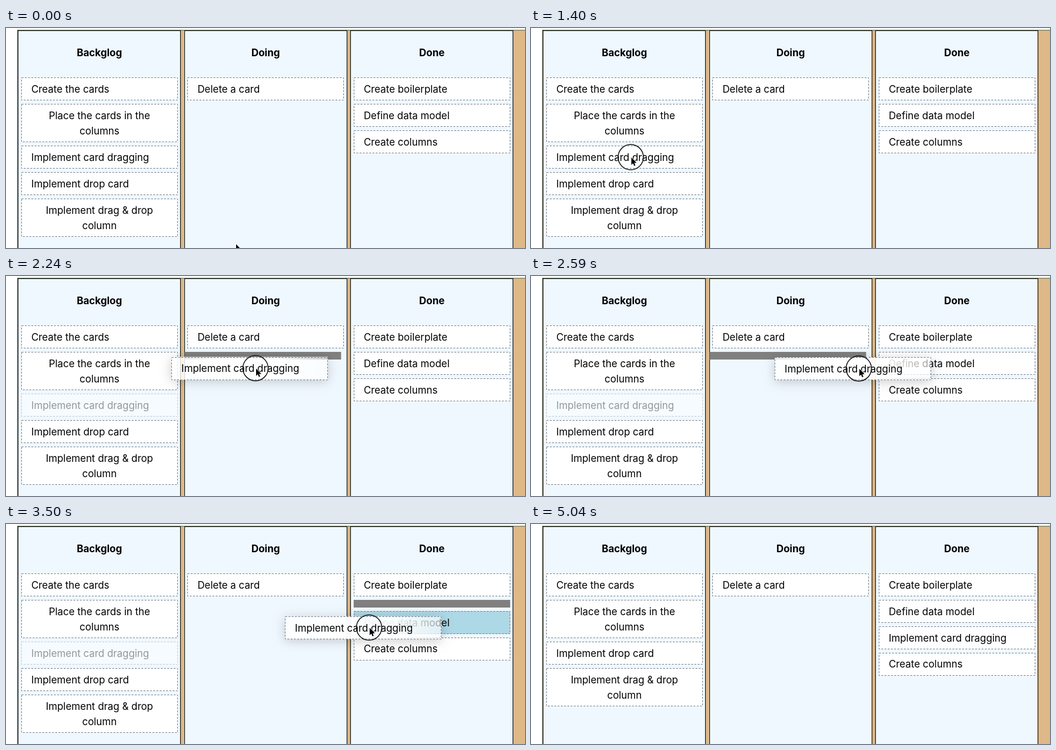
These frames come from a looping animation (882 by 374 pixels, 5740 ms). An HTML page with a canvas:

```html
<!DOCTYPE html>
<html lang="en">
<head>
<meta charset="utf-8">
<title>Kanban board</title>
<style>
  html, body { margin: 0; width: 882px; height: 374px; overflow: hidden; background: #fff; }
  canvas { display: block; }
</style>
</head>
<body>
<canvas id="board" width="882" height="374"></canvas>
<script>
const ctx = document.getElementById('board').getContext('2d');
const LOOP = 5740, STEP = 70;
const FONT = 'Inter, "Open Sans", sans-serif';
const CARD_W = 266, CARD_H = 39, LINE = 26.4, GAP = 5.8, BAR_H = 13;
const MOVED = 'Implement card dragging';
const PICK = 1680, DROP = 4480, GONE = 5040;

// Pointer path: time, x, y, eased segment towards this point
const path = [
  [0, 390, 367], [70, 270, 255], [140, 177, 166], [280, 177, 166],
  [700, 180.5, 218, 1], [980, 180.5, 218], [1330, 169.5, 219.6, 1], [1610, 169.5, 219.6],
  [2240, 424, 156.7, 1], [2590, 557, 157.2], [2870, 581, 157.2],
  [3080, 612, 160.2], [3500, 617, 176], [3850, 623, 205],
  [4900, 623, 205], [4970, 578, 243], [LOOP, 578, 243]
];

function pointerAt(t) {
  const i = Math.max(1, path.findIndex(p => p[0] >= t));
  const [t0, x0, y0] = path[i - 1], [t1, x1, y1, ease] = path[i];
  let k = (t - t0) / (t1 - t0);
  if (ease) k = k * k * (3 - 2 * k);
  return [x0 + (x1 - x0) * k, y0 + (y1 - y0) * k];
}

function rect(x, y, w, h, color) {
  ctx.fillStyle = color;
  ctx.fillRect(x, y, w, h);
}

function text(str, x, y, align = 'left', font = '16.9px ') {
  ctx.font = font + FONT;
  ctx.textAlign = align;
  ctx.fillStyle = '#000';
  ctx.fillText(str, x, y);
}

function drawCard(label, x, y, fill = '#fff') {
  const lines = label.split('\n');
  const h = CARD_H + (lines.length - 1) * LINE;
  const left = Math.round(x), top = Math.round(y), height = Math.round(h);
  rect(left, top, CARD_W, height, fill);
  ctx.strokeStyle = '#74808c';
  ctx.lineWidth = 1;
  ctx.setLineDash([3.3, 2.2]);
  ctx.strokeRect(left + .5, top + .5, CARD_W - 1, height - 1);
  ctx.setLineDash([]);
  if (lines.length === 1) text(label, x + 17.1, y + 25.8);
  else lines.forEach((s, i) => text(s, x + CARD_W / 2, y + 25.8 + i * LINE, 'center'));
  return h + GAP;
}

function drawColumn(index, title, cards, state) {
  const left = 20 + index * 282.5, x = left + 5.8;
  rect(left, 4, 277, 380, '#f0f8ff');
  ctx.strokeStyle = '#101510';
  ctx.lineWidth = 1.2;
  ctx.strokeRect(Math.round(left) + .5, 4.5, 276, 390);
  text(title, left + 138.7, 48, 'center', '700 17px ');
  let y = 84.2;
  cards.forEach((label, i) => {
    const target = state.bar === i;
    if (target) {
      rect(x, y, CARD_W, BAR_H, '#808080');
      y += BAR_H + GAP;
    }
    ctx.globalAlpha = label === state.faded ? .4 : 1;
    y += drawCard(label, x, y, target ? '#add8e6' : '#fff');
    ctx.globalAlpha = 1;
  });
  if (state.bar === cards.length) rect(left + 1, y, CARD_W, BAR_H, '#808080');
}

function drawDragged(x, y) {
  // Shadow only around the card, never under its translucent face
  ctx.save();
  ctx.beginPath();
  ctx.rect(0, 0, 882, 374);
  ctx.rect(Math.round(x), Math.round(y), CARD_W, CARD_H);
  ctx.clip('evenodd');
  ctx.shadowColor = 'rgba(0,0,0,.2)';
  ctx.shadowBlur = 18;
  ctx.shadowOffsetY = 3;
  rect(x, y, CARD_W, CARD_H, '#fff');
  ctx.restore();
  const face = ctx.createLinearGradient(x, 0, x + CARD_W, 0);
  [[0, .8], [.3, .95], [.7, .94], [1, .6]].forEach(([stop, a]) =>
    face.addColorStop(stop, `rgba(255,255,255,${a})`));
  drawCard(MOVED, x, y, face);
}

function drawPointer(x, y, pressed) {
  if (pressed) {
    ctx.beginPath();
    ctx.arc(x, y, 21.5, 0, 2 * Math.PI);
    ctx.strokeStyle = '#111';
    ctx.lineWidth = 1.5;
    ctx.stroke();
  }
  ctx.save();
  ctx.translate(x + 1, y + .5);
  ctx.scale(.9, .9);
  const arrow = new Path2D('M0 0V14L3.2 11L5.4 16L7.7 15L5.6 10.2H10Z');
  ctx.strokeStyle = '#fff';
  ctx.lineWidth = 1.8;
  ctx.stroke(arrow);
  ctx.fillStyle = '#000';
  ctx.fill(arrow);
  ctx.restore();
}

function draw(t) {
  const [px, py] = pointerAt(t);
  const dragging = t >= PICK && t < DROP, dropped = t >= DROP;
  const backlog = ['Create the cards', 'Place the cards in the\ncolumns', MOVED,
    'Implement drop card', 'Implement drag & drop\ncolumn'];
  const done = ['Create boilerplate', 'Define data model', 'Create columns'];
  if (dropped) done.splice(2, 0, ...backlog.splice(2, 1));

  rect(0, 0, 882, 374, '#fff');
  rect(20, 4, 862, 370, '#deb887');
  rect(19.4, 3.2, 863, 1.1, '#56664a');
  rect(19.4, 3.2, 1.1, 371, '#28321e');

  const overDoing = dragging && px > 303 && px < 579;
  const overDone = dragging && px > 585;
  drawColumn(0, 'Backglog', backlog, { faded: dragging && MOVED });
  drawColumn(1, 'Doing', ['Delete a card'], { bar: overDoing ? 1 : -1 });
  drawColumn(2, 'Done', done, { bar: overDone ? (py > 189 ? 2 : 1) : -1 });

  if (dragging) drawDragged(px - 143, py - 19.2);
  const pressed = t >= 770 && t < 910 || t >= 1400 && t < DROP;
  if (t < GONE) drawPointer(px, py, pressed);
}

function tick() {
  const t = performance.now() % LOOP;
  draw(Math.floor(t / STEP) * STEP);
  requestAnimationFrame(tick);
}
tick();
</script>
</body>
</html>
```
